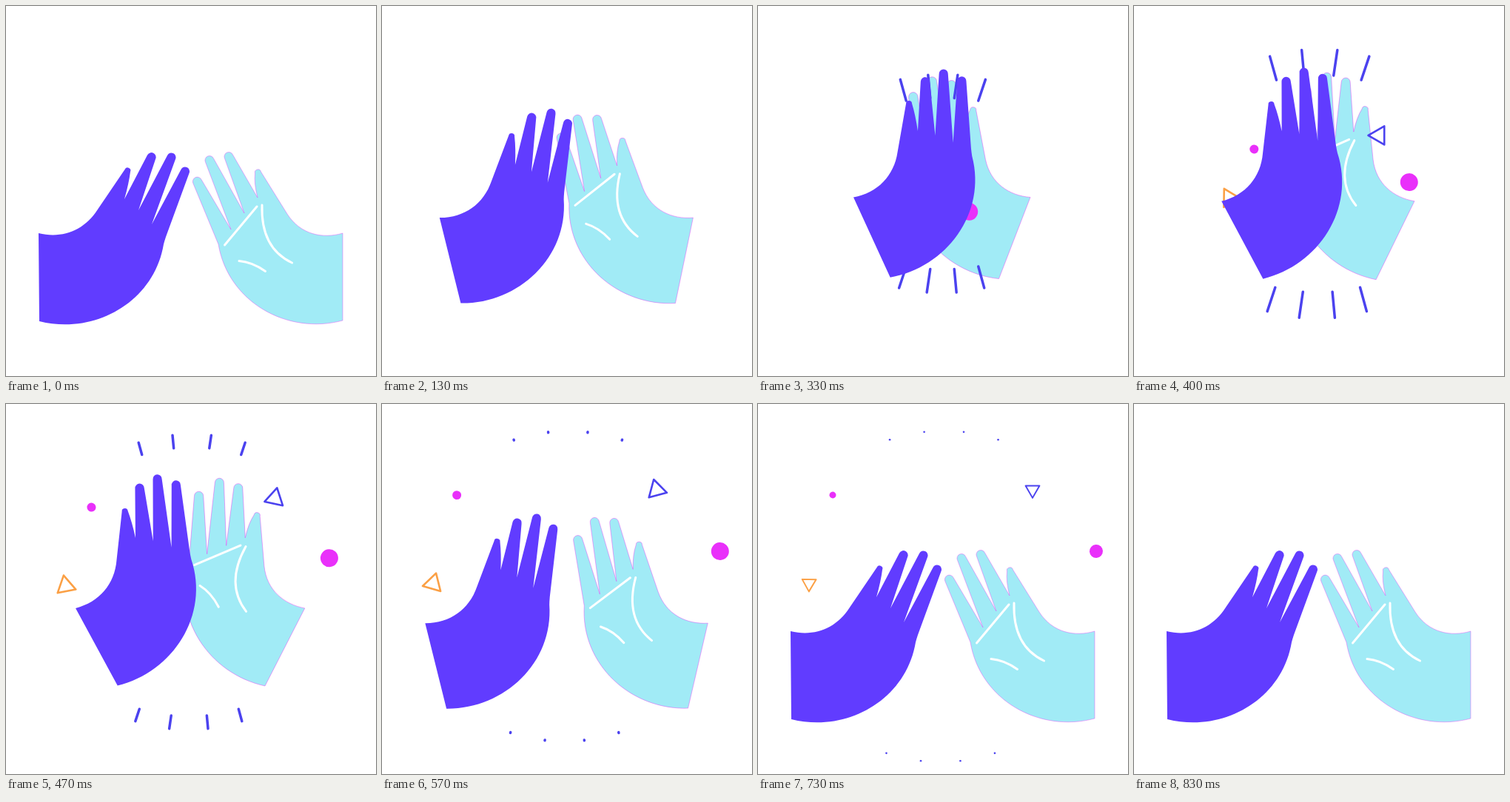
Write an HTML page that moves like this. It is 500 px wide and 500 px high and loops after 1330 ms.

```html
<!DOCTYPE html>
<html lang="en">
<head>
<meta charset="utf-8">
<title>High five</title>
<style>
  html, body { margin: 0; width: 100%; height: 100%; overflow: hidden; background: #fff; }
  svg { display: block; width: 100%; height: 100%; }
  .line { fill: none; stroke-linecap: round; stroke-linejoin: round; }
</style>
</head>
<body>
<svg viewBox="0 0 500 500">
  <g id="right">
    <path fill="#a1ebf6" stroke="#e23cf5" stroke-width=".7" stroke-opacity=".6" d="M455 307V425C380 445 300 400 287 322
      L253 240A6 6 0 0 1 264 234.500L304 302
      L269.500 211A6 6 0 0 1 280.500 206L322 280
      L295.500 206A6 6 0 0 1 306.500 201L340 259
      Q335 240 336.500 226A4 4 0 0 1 344.500 224L380 281C398 309 428 315 455 307Z"/>
    <path class="line" stroke="#fff" stroke-width="3" d="M295.500 323L339 271M346 269Q344 327 386.500 347M315 344.500Q333 346 350.500 358.500"/>
  </g>
  <g id="burst" class="line" stroke="#4b42ef"></g>
  <g id="confetti"></g>
  <g id="left">
    <path fill="#613cff" d="M44 307L45 426C120 445 200 400 213 322
      Q214 318 216 312L247.500 226A6 6 0 0 0 236.500 221L197 295
      L229 207A6 6 0 0 0 218 202L179 276
      L202 207A6 6 0 0 0 191 201.500L160 261
      Q166 240 168 224A4 4 0 0 0 160.500 221L123.500 275.500C106 303 76 315 44 307Z"/>
  </g>
</svg>
<script>
const LOOP = 1330, FPS = 30;
const HIT = 10, PEAK = 13, REST = 22, END = 25; // in steps of 1/30 s
const $ = id => document.getElementById(id);
const clamp = u => Math.min(1, Math.max(0, u));
const mix = (a, b, u) => a + (b - a) * u;

// Goes from 0 to 1 between two steps; p softens the start, q the landing
const ease = (k, from, to, p, q) =>
  1 - (1 - clamp((k - from) / (to - from)) ** p) ** q;

function add(parent, tag, attrs) {
  const el = document.createElementNS("http://www.w3.org/2000/svg", tag);
  for (const key in attrs) el.setAttribute(key, attrs[key]);
  return parent.appendChild(el);
}

// Each hand is rigid: it slides and turns about the upper cuff corner
const CUFF = 307, LIFT = 48.5;
const hands = [
  { el: $("left"), x: 44, reach: 85, swing: -24.2, kick: -5 },
  { el: $("right"), x: 455, reach: -87, swing: 21.1, kick: 7.2 }
];

function drawHands(k) {
  const across = ease(k, 0, HIT, 1.6, 1.93) - ease(k, HIT, REST, 1.9, 4);
  const up = ease(k, 0, HIT, 1.6, 2.15) - ease(k, HIT, REST, 1.9, 3.37);
  const swung = ease(k, 0, HIT, 1.2, 2);
  const kicked = ease(k, HIT, PEAK, 2, 2);
  const held = 1 - ease(k, PEAK, REST, 2, 3.5);
  for (const { el, x, reach, swing, kick } of hands) {
    const angle = (swing * swung + kick * kicked) * held;
    el.setAttribute("transform",
      `translate(${reach * across} ${-LIFT * up}) rotate(${angle} ${x} ${CUFF})`);
  }
}

// Four rays fan out above the hands and four below
const rays = [];
for (const side of [-1, 1]) {
  for (let m = -1.5; m <= 1.5; m++) {
    rays.push({
      side,
      inner: [249 + 32.5 * m, 240 + side * (116 - 1.8 * m * m)],
      outer: [249 - 2.3 * side + m * (54 - 2.3 * m * m), 240.5 + side * (204 - 5.2 * m * m)],
      el: add($("burst"), "line", {})
    });
  }
}

function drawRays(k) {
  const ends = [ease(k, 10, 19, 1.5, 3.9), ease(k, 8, 18, 1.5, 4.76)];
  const drop = 40 * ease(k, 14, 24, 2, 3.65);
  for (const { side, inner, outer, el } of rays) {
    ends.forEach((u, i) => {
      el.setAttribute("x" + (i + 1), mix(inner[0], outer[0], u));
      el.setAttribute("y" + (i + 1), mix(inner[1], outer[1], u) + (side > 0 ? drop : 0));
    });
  }
}

const ball = r => ["circle", { r, fill: "#e930fa" }];
const triangle = stroke => ["path", {
  d: "M14.500 0L-7.250 12.560V-12.560Z", class: "line", stroke, "stroke-width": 2.6
}];
const START = { x: 250, y: 294 };
// Triangles run slightly ahead and turn by "spin" degrees per step
const bits = [
  { shape: ball(12), x: 457, y: 199, spin: 0, lead: 0 },
  { shape: ball(6), x: 101, y: 123, spin: 0, lead: 0 },
  { shape: triangle("#fba045"), x: 69, y: 242.5, spin: 9, lead: .4 },
  { shape: triangle("#4b42ef"), x: 371, y: 116, spin: -9, lead: .4 }
].map(bit => ({ ...bit, el: add($("confetti"), ...bit.shape) }));

function drawBits(k, size) {
  for (const { el, x, y, spin, lead } of bits) {
    const u = ease(k + lead, 8, 20, 2.2, 9.5);
    const angle = spin * (k - 19) + (spin > 0 ? 64 : -3);
    el.setAttribute("transform",
      `translate(${mix(START.x, x, u)} ${mix(START.y, y, u)}) rotate(${angle}) scale(${size})`);
  }
}

function draw(ms) {
  // The picture advances in whole steps on a 10 ms clock
  const k = Math.floor((Math.floor(ms / 10) * 10 + 3.4) * FPS / 1000);
  const size = clamp((END - k) / 4);
  drawHands(k);
  drawRays(k);
  drawBits(k, size);
  $("burst").setAttribute("stroke-width", 3.5 * size);
  $("burst").style.display = $("confetti").style.display = k >= 9 && k < END ? "inline" : "none";
}

const began = performance.now();
function tick() {
  draw((performance.now() - began) % LOOP);
  requestAnimationFrame(tick);
}
tick();
</script>
</body>
</html>
```
